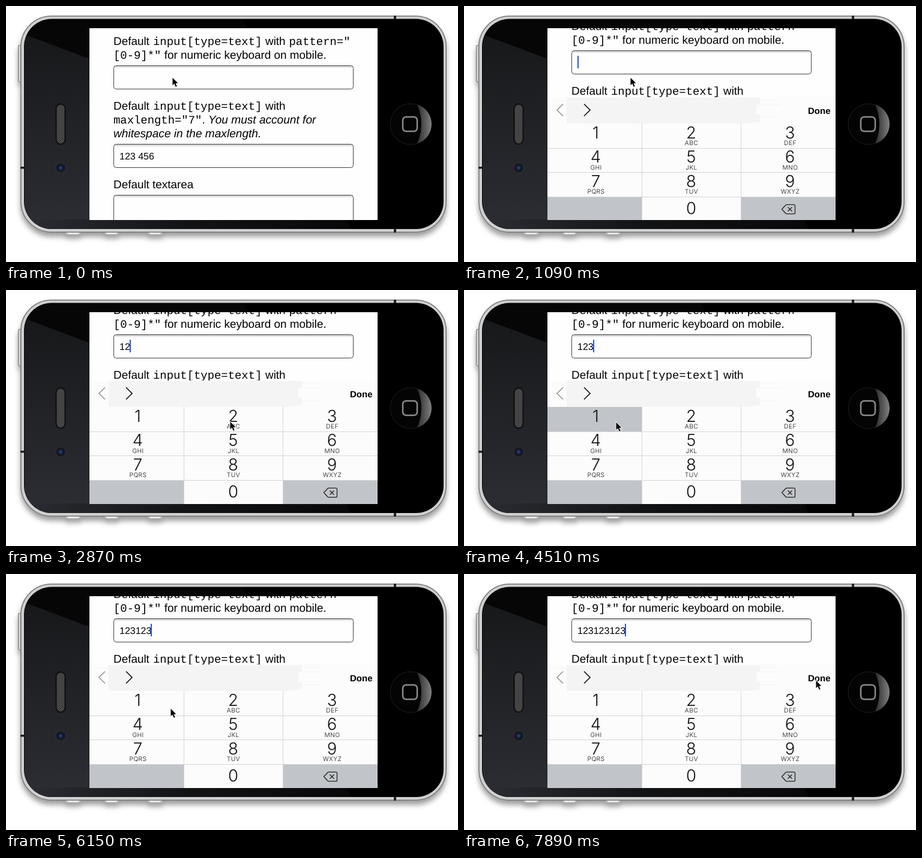
Write an HTML page that moves like this. It is 753x427 px and loops after 8 s.

```html
<!DOCTYPE html>
<html lang="en">
<head>
<meta charset="utf-8">
<title>Numeric keyboard on mobile</title>
<style>
  html, body { margin: 0; width: 100%; height: 100%; overflow: hidden; background: #fff; }
  svg { display: block; }
  text { text-rendering: geometricPrecision; }
  .copy { font: 18.9px "Liberation Sans", Arial, sans-serif; white-space: pre; }
  .copy .code { font-family: "Liberation Mono", "Courier New", monospace; }
  .copy .em { font-style: italic; font-size: 19.1px; }
  .value { font: 16px "Liberation Sans", Arial, sans-serif; }
  .field { fill: #fefefe; stroke: #444; }
  .digit { font: 300 27.5px Inter, "Liberation Sans", sans-serif; text-anchor: middle; }
  .letters { font: 300 10.3px Inter, "Liberation Sans", sans-serif; letter-spacing: .4px; text-anchor: middle; }
  .done { font: bold 15px "Liberation Sans", Arial, sans-serif; }
</style>
</head>
<body>
<svg width="753" height="427" viewBox="0 0 753 427">
  <defs>
    <linearGradient id="glare" x2="0" y2="1">
      <stop offset="0" stop-color="#17181a"/><stop offset="1" stop-color="#2b2d33"/>
    </linearGradient>
    <linearGradient id="strip">
      <stop offset="0" stop-color="#2b2d33"/><stop offset=".5" stop-color="#121315"/><stop offset="1" stop-color="#08080a"/>
    </linearGradient>
    <linearGradient id="button">
      <stop offset="0" stop-color="#777"/><stop offset=".25" stop-color="#f4f4f4"/>
      <stop offset=".75" stop-color="#f0f0f0"/><stop offset="1" stop-color="#777"/>
    </linearGradient>
    <linearGradient id="shine">
      <stop offset="0" stop-color="#2a2a2a"/><stop offset="1" stop-color="#808080"/>
    </linearGradient>
    <linearGradient id="inset" x2="0" y2="1">
      <stop offset="0" stop-color="#000" stop-opacity=".22"/><stop offset="1" stop-color="#000" stop-opacity="0"/>
    </linearGradient>
    <radialGradient id="lens">
      <stop offset="0" stop-color="#34509c"/><stop offset=".5" stop-color="#1a2752"/><stop offset="1" stop-color="#10131f"/>
    </radialGradient>
    <pattern id="mesh" width="3" height="3" patternUnits="userSpaceOnUse">
      <path d="M0 0h3v3h-3z" fill="#222"/><path d="M0 0h1.5v1.5h-1.5zM1.5 1.5h1.5v1.5h-1.5z" fill="#666"/>
    </pattern>
    <clipPath id="glass"><rect x="31" y="22" width="698" height="350" rx="45"/></clipPath>
    <clipPath id="screen"><rect x="139" y="37" width="480" height="320"/></clipPath>
    <filter id="shadow" x="-10%" y="-10%" width="120%" height="130%">
      <feDropShadow dx="0" dy="7" stdDeviation="4" flood-opacity=".38"/>
    </filter>
  </defs>

  <g id="phone">
    <g filter="url(#shadow)">
      <rect x="20.5" y="65.5" width="6" height="61" rx="1.5" fill="#ccc" stroke="#777"/>
      <g fill="url(#button)" stroke="#999" stroke-width=".8">
        <path d="M96 377Q99 381 104 381H120Q125 381 128 377z"/>
        <path d="M161 377Q164 381 169 381H183Q188 381 191 377z"/>
        <path d="M233 377Q236 381 241 381H256Q261 381 264 377z"/>
      </g>
      <rect x="24.8" y="16.8" width="708.4" height="360.4" rx="51" fill="#d0d0d0" stroke="#777" stroke-width="1.6"/>
    </g>
    <path d="M646 16h4v7h-4zM646 371h4v7h-4zM24 268h8v3.500h-8z" fill="#222"/>
    <rect x="30" y="21.500" width="699" height="350.500" rx="46"/>
    <g clip-path="url(#glass)">
      <path d="M30 22H395L403 38H139V88L30 47z" fill="#060607"/>
      <path d="M30 47L139 88V357H30z" fill="url(#glare)"/>
      <path d="M30 356H567L575 373H30z" fill="url(#strip)"/>
    </g>
    <rect x="83.500" y="163.500" width="15" height="67" rx="7.500" fill="url(#mesh)" stroke="#0c0c0d" stroke-width="2"/>
    <circle cx="91" cy="270" r="8.500" fill="#171920" stroke="#34363b"/>
    <circle cx="91" cy="270" r="5" fill="url(#lens)"/>
    <circle cx="674" cy="197" r="34" fill="#040404" stroke="#1e1e1e"/>
    <path d="M685 164.500A34 34 0 0 1 685 229.500Q699 197 685 164.500z" fill="url(#shine)"/>
    <rect x="661" y="185" width="24" height="24" rx="5.500" fill="none" stroke="#8c8c8c" stroke-width="2.500"/>
  </g>

  <g clip-path="url(#screen)">
    <rect x="139" y="37" width="480" height="320" fill="#fefefe"/>
    <g id="page">
      <g class="copy">
        <text x="179" y="65">Default <tspan class="code" x="245">input[type=text]</tspan><tspan x="432">with</tspan><tspan class="code" x="471.500">pattern="</tspan></text>
        <text x="179" y="88"><tspan class="code">[0-9]*"</tspan><tspan x="263.800">for numeric keyboard on mobile.</tspan></text>
        <text x="179" y="173">Default <tspan class="code" x="245">input[type=text]</tspan><tspan x="432">with</tspan></text>
        <text x="179" y="196"><tspan class="code">maxlength="7"</tspan>. <tspan class="em" x="337">You must account for</tspan></text>
        <text x="179" y="219" class="em">whitespace in the maxlength.</text>
        <text x="179" y="304">Default textarea</text>
      </g>
      <g id="fields"></g>
      <text class="value" x="189" y="256">123 456</text>
      <text class="value" id="typed" x="189" y="125"></text>
      <rect id="caret" y="108" width="2" height="21" fill="#2b52e2"/>
    </g>

    <g id="keyboard">
      <rect x="139" y="151" width="480" height="210" fill="#fcfcfc"/>
      <path d="M171 152H493V163H487V180H493V192L470 195H171z" fill="#f4f4f4"/>
      <path d="M152 156.500H171M150 165.500H171M154 180.500H171M492 155.500H520M490 163.500H527M492 184.500H523" stroke="#f4f4f4"/>
      <g fill="none" stroke-width="1.700">
        <path d="M165 162.500L155 172.500L165 182.500" stroke="#999"/>
        <path d="M200 162.500L210 172.500L200 182.500" stroke="#111"/>
      </g>
      <text class="done" x="573" y="179">Done</text>
      <path d="M139 317h157.500v44H139zM461.500 317H619v44H461.500z" fill="#c1c4c9"/>
      <rect id="pressed" y="195" height="41.500" fill="#c1c4c9"/>
      <path d="M139 236.500H619M139 276.500H619M139 317.500H619M296.500 195V357M461.500 195V357" stroke="#d6d6d8"/>
      <g id="keys" fill="#111"></g>
      <g fill="none" stroke="#222" stroke-width="1.300" stroke-linejoin="round">
        <path d="M529.500 338L536 331Q536.700 330.300 538 330.300H549.500Q551.500 330.300 551.500 332.300V343.700Q551.500 345.700 549.500 345.700H538Q536.700 345.700 536 345z"/>
        <path d="M539.500 334.500L546.500 341.500M546.500 334.500L539.500 341.500"/>
      </g>
    </g>
  </g>

  <path id="cursor" d="M.5 .8V13.300L3.400 10.600L5.700 15.800L7.700 14.900L5.500 9.800H9.500z" stroke="#fff" stroke-width="1.800" paint-order="stroke"/>
</svg>

<script>
const $ = id => document.getElementById(id);
const LOOP = 8000;

// Bursts of steps: first ms, last ms, step count
const bursts = [
  [500, 1240, 6], [1690, 2720, 8], [2870, 3770, 7], [3920, 4960, 8],
  [5110, 6150, 8], [6290, 6990, 6], [7140, 7290, 2], [7440, 7890, 4]
];
const times = bursts.flatMap(([from, to, n]) =>
  Array.from({ length: n }, (_, i) => Math.floor((from + (to - from) * i / (n - 1)) / 10) * 10));

// Keyboard distance below its resting place, per opening step
const slide = [175, 88, 26, 6, 1, 0];

// Pointer stops: step, x, y
const stops = [
  [5, 277, 119], [9, 236, 216], [10, 236, 216], [13, 373, 219], [14, 373, 219],
  [17, 510, 217], [18, 510, 217], [25, 253, 220], [26, 253, 220], [28, 370, 222],
  [29, 370, 222], [33, 505, 228], [34, 505, 228], [36, 274, 224], [37, 268, 227],
  [38, 268, 227], [41, 381, 224], [42, 381, 224], [44, 549, 222], [45, 552, 222],
  [46, 552, 222], [48, 586, 177]
];
// Steps at which 1, 2, 3 are pressed in turn; the digit appears one step later
const presses = [9, 13, 17, 25, 28, 33, 37, 41, 45];
const columns = [[139, 157.5], [297, 164.5], [462, 157]];
const centers = [219.5, 378.5, 543];

$('fields').innerHTML = [99, 230, 315].map((y, i) =>
  `<rect class="field" x="179.5" y="${y + .5}" width="399" height="${i < 2 ? 39 : 80}" rx="4"/>
   <rect x="180.5" y="${y + 1}" width="397" height="4" rx="2" fill="url(#inset)"/>`).join('');

const letters = ['', 'ABC', 'DEF', 'GHI', 'JKL', 'MNO', 'PQRS', 'TUV', 'WXYZ'];
$('keys').innerHTML = letters.map((label, i) => {
  const x = centers[i % 3], y = 219.5 + 40.6 * Math.floor(i / 3);
  return `<text class="digit" x="${x}" y="${y}">${i + 1}</text>
    <text class="letters" x="${x + .5}" y="${y + 11.5}">${label}</text>`;
}).join('') + `<text class="digit" x="${centers[1]}" y="346">0</text>`;

function pointerAt(step) {
  if (step <= stops[0][0]) return stops[0].slice(1);
  const n = stops.findIndex(s => s[0] >= step);
  const [a, ax, ay] = stops[n - 1], [b, bx, by] = stops[n];
  const k = (step - a) / (b - a);
  return [ax + (bx - ax) * k, ay + (by - ay) * k].map(Math.round);
}

const move = (id, x, y) => $(id).setAttribute('transform', `translate(${x} ${y})`);

function draw(ms) {
  const step = times.filter(t => t <= ms).length - 1;
  const drop = step < 0 ? 210 : slide[Math.min(step, 5)];
  move('keyboard', 0, drop);
  move('page', 0, -Math.round(25 * (1 - drop / 210)));
  move('cursor', ...pointerAt(step));

  const count = presses.filter(p => p < step).length;
  $('typed').textContent = '123123123'.slice(0, count);
  $('caret').setAttribute('x', Math.floor(189 + 8.8 * count));
  $('caret').style.display = step < 0 ? 'none' : '';

  const active = presses.indexOf(step);
  const [x, width] = active < 0 ? [0, 0] : columns[active % 3];
  $('pressed').setAttribute('x', x);
  $('pressed').setAttribute('width', width);
}

const start = performance.now();
function tick() {
  draw((performance.now() - start) % LOOP);
  requestAnimationFrame(tick);
}
tick();
</script>
</body>
</html>
```
